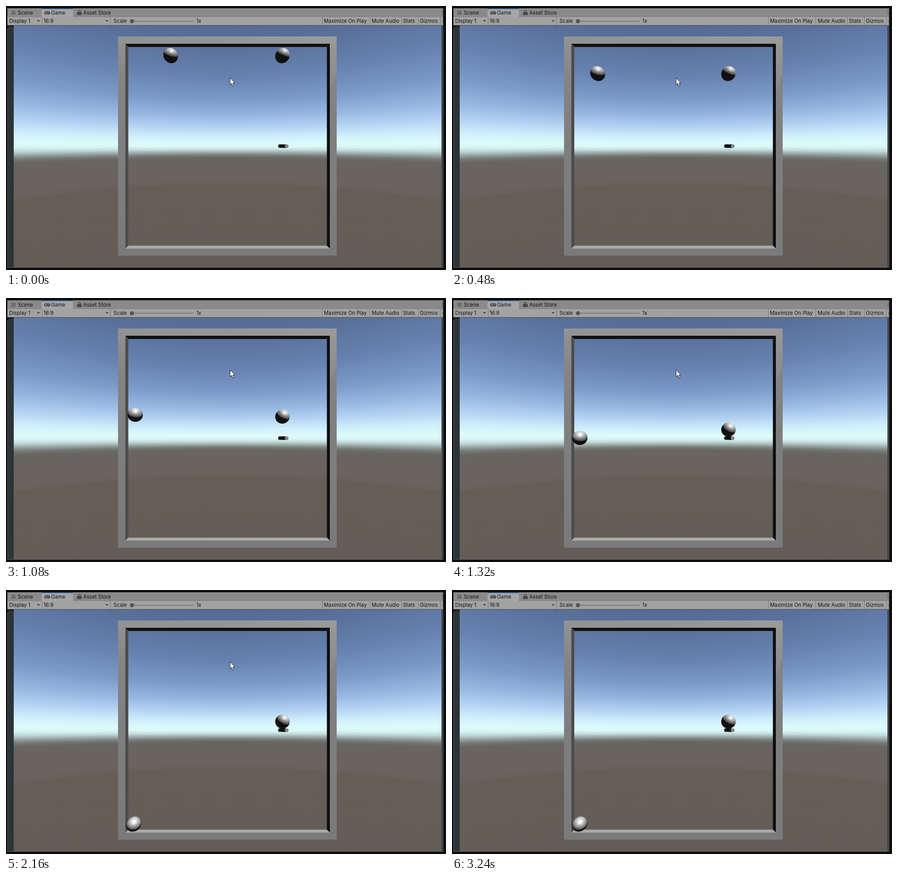
Recreate the animation shown at these times as an HTML page with a canvas. Size 966 px wide and 580 px high, loop 3420 ms.

```html
<!DOCTYPE html>
<html lang="en">
<head>
<meta charset="utf-8">
<title>Pendulum ball test</title>
<style>
html, body { margin: 0; width: 100%; height: 100%; overflow: hidden; background: #0e0d10; }
canvas, svg { position: absolute; left: 0; top: 0; width: 966px; height: 580px; display: block; }
text { font: 11.2px Inter, "Liberation Sans", sans-serif; fill: #131313; }
</style>
</head>
<body>
<canvas id="sky" width="966" height="580"></canvas>
<svg viewBox="0 0 966 580" width="966" height="580">
  <defs>
    <linearGradient id="face" gradientUnits="userSpaceOnUse" x1="0" y1="67" x2="0" y2="548">
      <stop offset="0" stop-color="#949494"/>
      <stop offset=".06" stop-color="#8e8e8e"/>
      <stop offset=".2" stop-color="#848484"/>
      <stop offset=".5" stop-color="#7f7f7f"/>
      <stop offset="1" stop-color="#7a7a7a"/>
    </linearGradient>
    <linearGradient id="glow" x1="0" y1="0" x2="1" y2="0">
      <stop offset="0" stop-color="#fff" stop-opacity="0"/>
      <stop offset="1" stop-color="#fff" stop-opacity=".07"/>
    </linearGradient>
  </defs>

  <!-- panel edges -->
  <path d="M3 42H17V574H3Z" fill="#2c3437"/>
  <path d="M956 42H959V574H956Z" fill="#3a4043"/>
  <path d="M3.5 5V574.5H959.5V5" fill="none" stroke="#5f6365"/>
  <path d="M3 42H17V45H8Q5 45 4 49H3Z" fill="#111"/>

  <!-- tab bar -->
  <rect x="3" y="5" width="956" height="19" fill="#8a8a8a"/>
  <rect x="78" y="5" width="69" height="20" fill="#a5a5a5"/>
  <rect x="78" y="5" width="69" height="2" fill="#3c66a6"/>
  <rect x="3" y="24" width="956" height="18" fill="#a2a2a2"/>
  <path d="M3 23.5H78M147 23.5H959" stroke="#7d7d7d"/>
  <path d="M3 42.5H959" stroke="#4a4d50"/>
  <path d="M79.5 24V42M229.5 24V42M694.5 24V42M798.5 24V42M868.5 24V42M905.5 24V42M953.5 24V42" stroke="#777"/>
  <path d="M13.5 10V20M16.5 10V20M19.5 10V20M11 11.5H21M11 14.5H21M11 17.5H21" stroke="#5b5b5b"/>
  <path d="M87.5 11.5H93.5A3.6 3.6 0 0 1 93.5 19Q91.500 19 90.5 17.300Q89.500 19 87.5 19A3.6 3.6 0 0 1 87.5 11.5Z" fill="#4f4f4f"/>
  <path d="M86 15H89.5M87.750 13.300V16.800M92 15H93.500M94 14H95" stroke="#a5a5a5"/>
  <path d="M156 13H166V20H156Z" fill="#484848"/>
  <path d="M158.500 13V12A2.500 2.500 0 0 1 163.500 12V13" fill="none" stroke="#484848" stroke-width="1.300"/>
  <path d="M957.500 10V12M957.500 13.500V15.500M957.500 17V19" stroke="#444" stroke-width="1.500"/>
  <path d="M67.500 31H75L71.250 35ZM218 31H225.500L221.750 35Z" fill="#4c4c4c"/>
  <path d="M957 32H959V35Z" fill="#4c4c4c"/>
  <path d="M276 33.500H412" stroke="#6c6c6c" stroke-width="1.600"/>
  <circle cx="276.500" cy="33.500" r="4.600" fill="#555"/>
  <text x="26" y="19.300">Scene</text>
  <text x="99" y="19.300">Game</text>
  <text x="169.500" y="19.300">Asset Store</text>
  <text x="7" y="37.300">Display 1</text>
  <text x="82.500" y="37.300">16:9</text>
  <text x="236" y="37.300">Scale</text>
  <text x="418" y="37.300">1x</text>
  <text x="698" y="37.300">Maximize On Play</text>
  <text x="803" y="37.300">Mute Audio</text>
  <text x="871.500" y="37.300">Stats</text>
  <text x="908.500" y="37.300">Gizmos</text>

  <!-- square frame -->
  <path d="M246 67H726V548.500H246ZM262 83V533H711V83Z" fill="url(#face)" fill-rule="evenodd"/>
  <path d="M262 67H726V83H262Z" fill="url(#glow)"/>
  <path d="M711 83H726V150L711 185Z" fill="#fff" opacity=".06"/>
  <path d="M262 83H711L704.500 90H268.500Z" fill="#101010"/>
  <path d="M711 83V533L704.500 526.500V90Z" fill="#0f0f0f"/>
  <path d="M262 83L268.500 90V526.500L262 533Z" fill="#4c4c4e"/>
  <path d="M262 533L268.500 526.500H704.500L711 533Z" fill="#a9a9a9"/>

  <!-- pin -->
  <path d="M616 304H600Q597.500 304.500 597.500 308T600 311.500L616 312Z" fill="#101010"/>
  <circle cx="616.200" cy="308" r="4" fill="#858585"/>

  <path id="cursor" d="M.5.500V15.500L4 12.300L6.400 18.200L9 17.100L6.600 11.400H11Z" fill="#fff" stroke="#151515" stroke-linejoin="round"/>
</svg>
<canvas id="balls" width="966" height="580"></canvas>
<script>
const LOOP = 3420, STEP = 60;
const MID_X = 486.5, MID_Y = 308, FOCAL = 459, RADIUS = 15.4;
const LIGHT = [0.321, -0.766, -0.557];
const cursor = document.getElementById("cursor");
const ballCtx = document.getElementById("balls").getContext("2d");

const clamp = (v, lo, hi) => Math.max(lo, Math.min(hi, v));
const dot = (a, b) => a[0] * b[0] + a[1] * b[1] + a[2] * b[2];
const unit = v => {
  const len = Math.hypot(...v);
  return v.map(c => c / len);
};

// Rows of equal elevation are hyperbolas, so each column stretches the same gradient.
function drawSky() {
  const ctx = document.getElementById("sky").getContext("2d");
  const stops = [
    [-265, "#566b94"], [-218, "#5a719c"], [-150, "#6783b1"], [-100, "#7c9bca"],
    [-65, "#98b8e2"], [-40, "#b5d4f3"], [-20, "#d0effb"], [-5, "#defafa"],
    [2, "#d8f4f4"], [8, "#c0d8d8"], [14, "#9aa8a6"], [20, "#767a76"],
    [26, "#686661"], [45, "#69635f"], [68, "#6c6360"], [80, "#6a615d"],
    [83, "#655e57"], [265, "#635d57"]
  ];
  const fill = ctx.createLinearGradient(0, -265, 0, 265);
  for (const [y, color] of stops) fill.addColorStop((y + 265) / 530, color);
  ctx.save();
  ctx.beginPath();
  ctx.rect(17, 43, 939, 531);
  ctx.clip();
  ctx.fillStyle = fill;
  for (let x = 17; x < 956; x++) {
    const stretch = Math.hypot(x + 0.5 - MID_X, FOCAL) / FOCAL;
    ctx.setTransform(1, 0, 0, stretch, 0, MID_Y);
    ctx.fillRect(x, -270, 1, 540);
  }
  ctx.restore();
}

// Sphere in perspective, lit by one directional light.
function drawBall(cx, cy) {
  const size = 40, left = Math.round(cx) - 20, top = Math.round(cy) - 20;
  const img = ballCtx.createImageData(size, size);
  const dx = cx - MID_X, dy = cy - MID_Y;
  const dist = Math.hypot(dx, dy), len = Math.hypot(dist, FOCAL);
  const ex = dx / dist, ey = dy / dist, sin = dist / len, cos = FOCAL / len;
  const view = [-ex * sin, -ey * sin, -cos];
  const radial = [ex * cos, ey * cos, -sin];
  const tangent = [-ey, ex, 0];
  const half = unit(LIGHT.map((c, i) => c + view[i]));

  for (let i = 0; i < size * size; i++) {
    const px = left + i % size + 0.5 - cx;
    const py = top + Math.floor(i / size) + 0.5 - cy;
    let a = (px * ex + py * ey) * cos / RADIUS;
    let b = (py * ex - px * ey) / RADIUS;
    const r = Math.hypot(a, b);
    const alpha = clamp((1 - r) * RADIUS + 0.5, 0, 1);
    if (!alpha) continue;
    if (r > 1) { a /= r; b /= r; }
    const depth = Math.sqrt(Math.max(0, 1 - a * a - b * b));
    const n = view.map((c, j) => a * radial[j] + b * tangent[j] + depth * c);
    const lambert = dot(n, LIGHT);
    const lit = clamp((lambert - 0.18) / 0.09, 0, 1);
    const shine = 60 * Math.pow(Math.max(0, dot(n, half)), 24);
    const shade = 16 + lit * (205 * lambert + shine);
    img.data.set([shade, shade, shade, alpha * 255], i * 4);
  }
  ballCtx.putImageData(img, left, top);
}

// Fall as segments: start step, height, speed, half acceleration.
const FALL = [[0, 109, 4.6, 0.33], [6, 148.5, 8.55, 0.225], [18, 283.5, 12, 0], [20, 307.5, 15, 0.21]];
function fall(k) {
  const [start, y, speed, acc] = FALL.filter(s => s[0] <= k).pop();
  const j = k - start;
  return y + speed * j + acc * j * j;
}

function render(t) {
  const tick = Math.floor(t / STEP);
  const k = clamp(tick - 2, 0, 34);
  ballCtx.clearRect(0, 0, 966, 580);
  drawBall(Math.max(280.5, 255.5 + 106 * Math.exp(-k / 12)), Math.min(514, fall(k)));
  drawBall(607, Math.min(289, fall(k) + Math.max(0, k - 12)));

  const lift = clamp(tick - 47, 0, 7);
  cursor.setAttribute("transform", `translate(491.5 ${157.5 - 142 * (lift / 6) ** 2})`);
  cursor.setAttribute("visibility", lift < 7 ? "visible" : "hidden");
}

let lastTick = -1;
const begin = performance.now();
function loop() {
  const t = (performance.now() - begin) % LOOP;
  const tick = Math.floor(t / STEP);
  if (tick !== lastTick) {
    lastTick = tick;
    render(t);
  }
  requestAnimationFrame(loop);
}

drawSky();
render(0);
loop();
</script>
</body>
</html>
```
